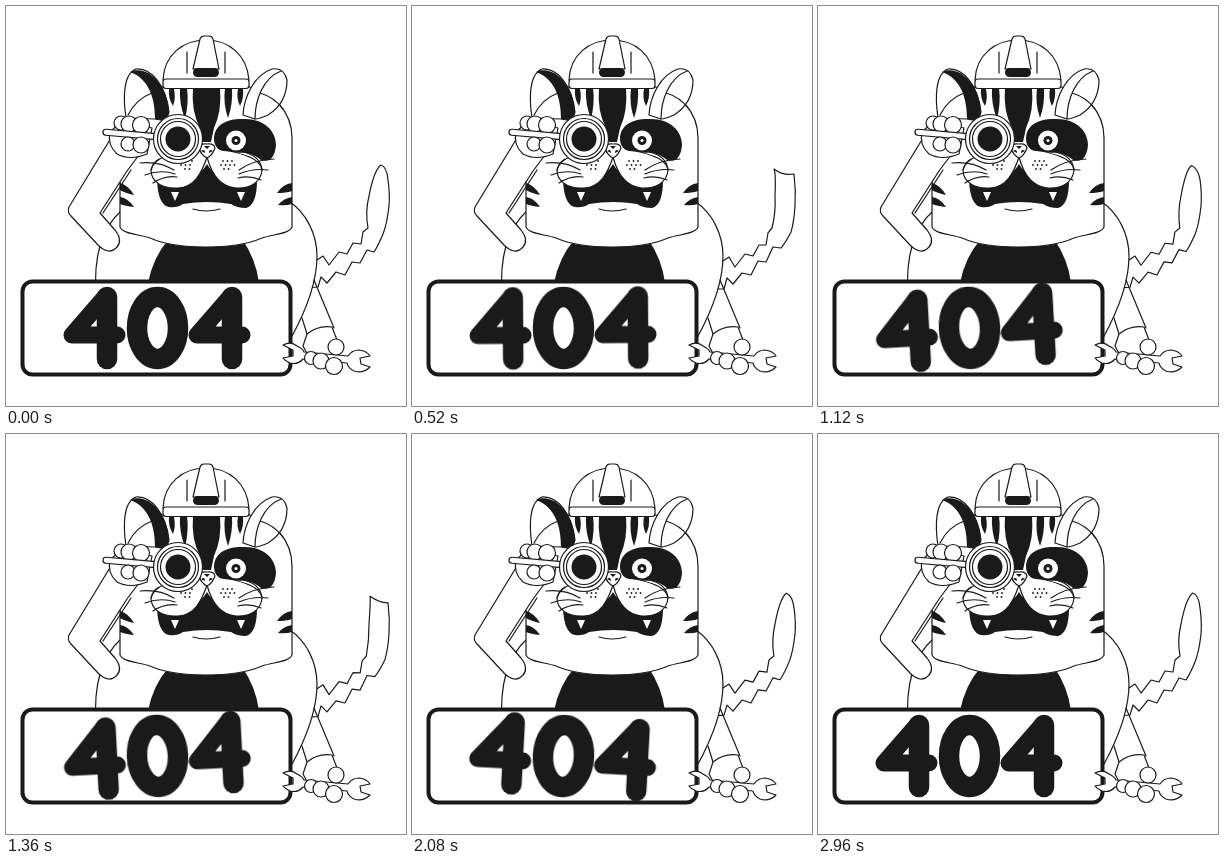
An HTML page that plays this animation: 400 px wide and 400 px high, repeating every 3 s.

```html
<!DOCTYPE html>
<html lang="en">
<head>
<meta charset="utf-8">
<title>404</title>
<style>
  html, body { margin: 0; width: 100%; height: 100%; overflow: hidden; background: #fff; }
  svg { display: block; width: 100vw; height: 100vh; }
  .art { fill: #fff; stroke: #1a1a1a; stroke-width: 1.2; stroke-linecap: round; stroke-linejoin: round; }
  .ink { fill: #1a1a1a; stroke: none; }
  .line { fill: none; }
  .paper { stroke: none; }
  .sign { stroke-width: 4; }
  .digits { fill: none; stroke-width: 20.5; transform-origin: 150px 322px; animation: tilt 3s linear infinite; }
  .thin { stroke-width: 17; }
  .tail { animation: sway 1s ease-in-out infinite; }

  @keyframes tilt {
    0%, 16% { transform: rotate(0); animation-timing-function: ease-out; }
    33% { transform: rotate(-3.2deg); animation-timing-function: ease-in-out; }
    42% { transform: rotate(-3.2deg); animation-timing-function: ease-in-out; }
    67% { transform: rotate(3.2deg); animation-timing-function: ease-in-out; }
    83%, 100% { transform: rotate(0); }
  }
  @keyframes sway {
    0%, 100% {
      d: path("M300 254 L311 254 L317 250 L323 259 L333 246 L341 248 L347 237 L355 238 L357 226 L362 222 Q359 206 363 190 Q368 164 375 159 Q381 161 382 174 Q384 188 383 200 Q381 218 377 228 Q372 240 368 246 L361 244 L354 257 L346 256 L339 269 L330 266 L321 277 L315 271 L312 281 L300 282 Z");
    }
    50% {
      d: path("M300 254 L311 255 L317 251 L323 261 L333 248 L341 250 L347 239 L354 239 L356 227 L360 222 Q364 206 363 190 Q364 168 362 163 Q371 170 382 168 Q384 184 383 200 Q382 216 379 226 Q374 236 369 242 L361 241 L354 256 L346 255 L339 269 L330 267 L321 278 L315 272 L312 283 L300 283 Z");
    }
  }
</style>
</head>
<body>
<svg viewBox="0 0 400 400">
  <g class="art">
    <path class="tail"/>

    <!-- body -->
    <path d="M115 205 C98 220 87 246 90 290 L285 332 C296 312 311 280 311 250 C311 228 300 207 284 196 Z"/>
    <path class="ink" d="M142 277 Q147 251 163 233 H236 Q250 253 253 277 Z"/>
    <path class="line" d="M308 274 L328 322 M296 312 L301 328"/>

    <!-- head -->
    <path d="M114 221 V157 C114 118 128 84 162 80 H240 C268 86 286 106 286 132 V221 C283 228 268 228 256 232 C240 239 222 241 200 241 C178 241 160 239 144 232 C132 228 117 228 114 221 Z"/>

    <!-- ears -->
    <path d="M120 112 C117 92 117 68 130 63 C146 62 160 80 163 106 L160 115 L149 113 Z"/>
    <path class="ink" d="M124 66 C142 58 162 80 163 106 L160 115 L149 113 C149 94 144 73 124 66 Z"/>
    <path class="line" d="M122 109 Q130 93 146 87"/>
    <path d="M237 109 C238 91 248 69 266 63 Q278 61 281 74 Q281 97 262 109 Q253 113 249 113 Z"/>
    <path class="line" d="M249 113 C249 94 257 72 275 65 M254 87 Q268 91 277 103"/>

    <!-- forehead stripes -->
    <g class="ink">
      <path d="M187 82 H214 Q216 105 208 122 L205 136 H197 L194 122 Q185 105 187 82 Z"/>
      <path d="M174 82 H181 Q183 97 179 113 Q173 98 174 82 Z"/>
      <path d="M163 83 H168 Q170 92 167 100 Q162 92 163 83 Z"/>
      <path d="M219 82 H226 Q227 98 222 112 Q217 98 219 82 Z"/>
      <path d="M232 83 H237 Q238 92 234 100 Q230 92 232 83 Z"/>
    </g>

    <!-- helmet -->
    <path d="M157 74 C158 49 177 34 200 34 C223 34 241 49 243 74 Z"/>
    <path class="line" d="M181 46 V67 M219 46 V67"/>
    <rect x="157" y="73" width="86" height="9.5" rx="3"/>
    <path d="M187 63 L194 33 Q195 30 198 30 H203 Q206 30 207 33 L213 63 Z"/>
    <rect class="ink" x="187" y="62" width="26" height="9" rx="4.5"/>

    <!-- eye -->
    <path class="ink" d="M208 133 C208 117 224 112 239 113 C258 113 270 125 270 139 C269 151 264 157 255 154 C248 148 240 146 229 147 C217 148 208 143 208 133 Z"/>
    <circle class="paper" cx="230" cy="134.5" r="10"/>
    <circle class="ink" cx="230" cy="134.5" r="4.5"/>
    <circle class="paper" cx="230" cy="134.5" r="1.5"/>

    <!-- mouth -->
    <path class="ink" d="M151 174 Q190 178 201 158 Q212 178 251 174 Q251 199 240 202 Q231 202 225 198 Q201 194 177 198 Q171 202 163 201 Q152 199 151 174 Z"/>
    <path class="paper" d="M165 186 L169 195 L173 186 Z M231 186 L235 195 L239 186 Z"/>
    <path d="M201 151 C196 166 189 181 172 182 C154 183 145 174 145 164 C148 151 171 143 195 147 L207 147 C230 144 254 151 256 164 C255 176 244 183 230 182 C213 181 205 166 201 151 Z"/>
    <path class="paper" d="M151 162 C151 148 184 143 200 144 C220 143 251 149 251 162 L225 169 L201 151 L176 169 Z"/>
    <path class="line" d="M145 164 Q147 156 153 153 M256 164 Q255 152 241 147"/>
    <path d="M193 142 Q194 137 201 138 Q208 137 209 142 Q206 150 201 152 Q195 149 193 142 Z"/>
    <path class="ink" d="M195 145 Q199 142 199 147 Z M207 145 Q203 142 203 147 Z M198 140 H204 L201 143 Z"/>
    <path class="line" d="M187 203 Q200 207 214 203 M134 157 Q153 155 168 164 M139 169 Q155 163 169 168 M147 177 Q159 169 171 171 M268 153 Q247 154 233 164 M262 164 Q247 162 233 168 M255 174 Q243 169 232 172"/>
    <path class="line" stroke-width="1.8" stroke-dasharray="0 4.5" d="M177 155 H187 M175 159 H188 M179 163 H186 M217 155 H227 M215 159 H229 M218 163 H226"/>

    <!-- cheek stripes -->
    <g class="ink">
      <path d="M114 177 Q122 179 128 189 Q119 187 114 184 Z M114 191 Q122 192 128 201 Q119 200 114 198 Z"/>
      <path d="M286 177 Q277 178 271 187 Q280 187 286 185 Z M286 191 Q278 192 272 199 Q280 200 286 198 Z"/>
    </g>

    <!-- raised arm -->
    <path d="M105 132 L63 201 Q61 206 65 210 L92 239 Q103 250 111 241 Q117 234 109 224 L94 207 L121 165 L133 149 Z"/>
    <path class="line" d="M97 207 L125 164"/>
    <path d="M104 126 Q101 139 111 148 Q124 155 141 148 L146 122 L116 115 Z"/>
    <circle cx="115" cy="117" r="7"/>
    <circle cx="123" cy="118" r="8"/>
    <circle cx="135" cy="119" r="8.5"/>
    <rect x="97" y="123" width="53" height="6" rx="3" transform="rotate(5 97 126)"/>
    <circle cx="122" cy="138" r="7"/>
    <circle cx="135" cy="139" r="8"/>

    <!-- magnifier -->
    <circle cx="172" cy="133" r="24.5"/>
    <circle cx="172" cy="133" r="20.5"/>
    <circle cx="172" cy="133" r="17.5"/>
    <circle class="ink" cx="172" cy="133" r="12.5"/>

    <!-- sign -->
    <rect class="sign" x="16.5" y="275.5" width="268" height="93" rx="10"/>
    <g class="digits">
      <g id="four">
        <path d="M101 291 V353"/>
        <path class="thin" d="M99 291 L66 329 H111"/>
      </g>
      <ellipse cx="151.5" cy="322" rx="20.5" ry="31"/>
      <use href="#four" x="125"/>
    </g>

    <!-- hand with wrench -->
    <path d="M297 340 L301 328 Q312 319 326 321 L331 334 L335 347 L306 357 Z"/>
    <path d="M277 339 Q285 335 291 340 Q297 343 298 346 L342 350 Q346 344 353 344 Q361 345 364 350 L354 352 L355 358 L364 361 Q357 368 348 365 Q342 362 341 357 L297 353 Q292 359 284 357 Q279 355 277 352 L287 350 V344 Z"/>
    <circle cx="305" cy="352" r="6.5"/>
    <circle cx="315" cy="355" r="8"/>
    <circle cx="328" cy="360" r="8.5"/>
    <circle cx="330" cy="341" r="8"/>
  </g>
</svg>
</body>
</html>
```
